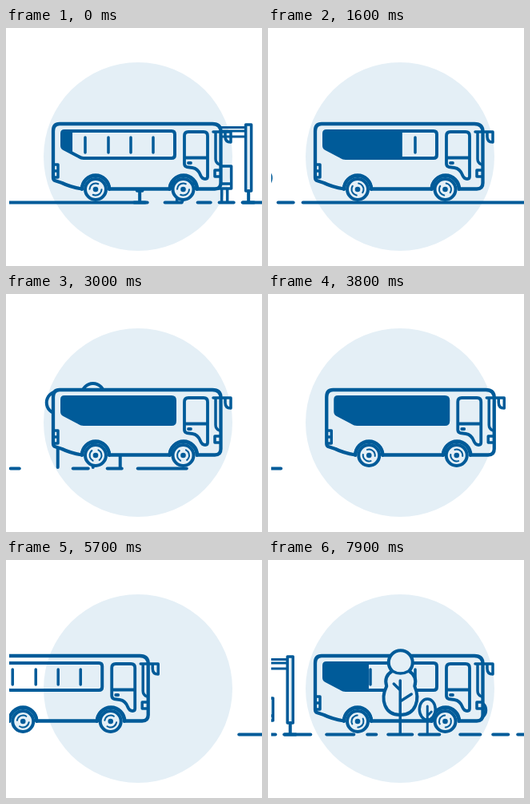
These frames come from a looping animation (320x298 px, 8 s). An HTML page with a canvas:

```html
<!DOCTYPE html>
<html lang="en">
<head>
<meta charset="utf-8">
<title>Bus ride</title>
<style>
html, body { margin: 0; height: 100%; overflow: hidden; background: #fff; }
canvas { display: block; }
</style>
</head>
<body>
<canvas id="stage" width="320" height="298"></canvas>
<script>
const ctx = document.getElementById('stage').getContext('2d');
const BLUE = '#005b99', PALE = '#e4eff6';
const LOOP = 8, CYCLE = 7.09, SPEED = 340, GROUND = 218.5;

const bodyPath = new Path2D('M67 120H258Q268.5 120 268.5 130V194Q268.5 201.5 261 201.5H239A17 17 0 0 0 205 201.5H129A17 17 0 0 0 95 201.5Q80 199 70 194L61 191Q59 190 59 187V129Q59 120 67 120Z');
const windowPath = new Path2D('M73 129H207Q211 129 211 133V159Q211 163 207 163H97Q94 163 91 161L72 151Q70 150 70 147V132Q70 129 73 129Z');
const doorPath = new Path2D('M228 130H247Q252 130 252 135V186Q252 189 249 189Q245 189 243 184Q240 176 233 175L226 174Q223 173 223 170V135Q223 130 228 130ZM223 162.5H252M228 169H231');
const bigTree = new Path2D('M156 139A15 15 0 1 1 177 139Q188 146 184 158C191 174 186 194 166 194S141 174 149 158Q145 146 156 139Z');
// Start and end of each stretch of road
const road = [[-183, 179], [197, 222], [238, 258], [265, 287], [294, 331], [347, 385], [398, 413], [424, 458],
  [463, 492], [514, 543], [555, 578], [586, 1008], [1024, 1039], [1102, 1125], [1145, 1167], [1183, 1248]];

function stroke(path, width = 4) {
  ctx.lineWidth = width;
  ctx.stroke(typeof path === 'string' ? new Path2D(path) : path);
}

function shape(path, width) {
  ctx.fillStyle = PALE;
  ctx.fill(path);
  stroke(path, width);
}

function disc(x, y, r, fill) {
  ctx.beginPath();
  ctx.arc(x, y, r, 0, 7);
  ctx.fillStyle = fill;
  ctx.fill();
}

function backdrop(shift = 0) {
  ctx.fillStyle = '#fff';
  ctx.fillRect(-shift, 0, 320, 298);
  disc(165 - shift, 161, 118, PALE);
}

function bush(x, y, r) {
  const crown = new Path2D();
  crown.arc(x, y, r, 0, 7);
  shape(crown);
}

function roundTree(x, y, r) {
  stroke(`M${x} ${y}V217`);
  bush(x, y, r);
}

function pole(x) {
  const post = new Path2D();
  post.rect(x - 3.5, 121, 7, 83);
  shape(post, 3.5);
  stroke(`M${x} 204V217M${x - 7} ${GROUND}H${x + 7}`);
}

function shelter() {
  stroke('M167 124.5H300M167 129H300M167 136H299', 3);
  stroke('M210 173H282V201H210ZM210 195H282M214 201V217M221 201V217M270 201V217M277 201V217', 3.5);
  pole(167.5);
  pole(303.5);
}

function frontTrees() {
  ctx.save();
  ctx.translate(275, 0);
  shape(bigTree);
  stroke('M156 139Q166 145 177 139M166 151V217M166 163L158 155M166 177L180 168', 3.5);
  const small = new Path2D();
  small.ellipse(200, 187, 10, 13, 0, 0, 7);
  shape(small, 3.5);
  stroke('M200 183V217M200 195L205 190', 3);
  ctx.restore();
}

function wheel(x, turn) {
  disc(x, 202, 13, PALE);
  ctx.lineWidth = 4;
  ctx.stroke();
  for (const a of [0, Math.PI]) {
    ctx.beginPath();
    ctx.arc(x, 202, 7.5, turn + a, turn + a + 2);
    ctx.lineWidth = 2;
    ctx.stroke();
  }
  disc(x, 202, 3.3, BLUE);
}

function bus(shift, filledTo, turn) {
  ctx.save();
  ctx.translate(shift, 0);
  ctx.save();
  ctx.clip(bodyPath);
  backdrop(shift);
  ctx.restore();
  stroke(bodyPath, 4.3);
  stroke('M99 137V156M128 137V156M156 137V156M184 137V156', 3.5);
  ctx.save();
  ctx.clip(windowPath);
  ctx.fillStyle = BLUE;
  ctx.fillRect(68, 126, filledTo - 68, 42);
  ctx.restore();
  stroke(windowPath);
  stroke(doorPath, 3.8);
  stroke('M60 171H65V187H60M60 179H65M267 178H261V186H267', 3.5);
  stroke('M259 130H281V143Q274 143 274 136V131M262 131V164Q262 169 267 171', 3.5);
  for (const x of [112, 221.5]) {
    ctx.beginPath();
    ctx.arc(x, 202, 17, Math.PI, 0);
    ctx.lineWidth = 4;
    ctx.stroke();
    wheel(x, turn);
  }
  ctx.restore();
}

function draw(t) {
  const s = t < 5 ? t : t - CYCLE;
  const travel = s < 3 ? SPEED * s : SPEED * 3 + 262 * (s - 3);
  const shift = t < 5 ? 450 * Math.max(0, t - 3.623) ** 2 : -253 * Math.max(0, 6.3 - t) ** 2;
  const filledTo = Math.min(214, Math.max(68, 83 + (s < 0 ? 16 : 53) * s));

  ctx.clearRect(0, 0, 320, 298);
  backdrop();
  ctx.save();
  ctx.beginPath();
  ctx.rect(4, 0, 316, 298);
  ctx.clip();
  ctx.strokeStyle = BLUE;
  ctx.lineCap = ctx.lineJoin = 'round';

  ctx.save();
  ctx.translate(-travel, 0);
  for (const [a, b] of road) stroke(`M${a + 2} ${GROUND}H${b - 2}`);
  shelter();
  bush(537, 188, 11);
  roundTree(1085, 136, 14);
  roundTree(1129, 126, 14);
  roundTree(1163, 180, 12);
  ctx.restore();

  bus(shift, filledTo, (travel + shift) / 15);

  ctx.save();
  ctx.translate(-travel, 0);
  frontTrees();
  ctx.restore();
  ctx.restore();
}

const start = performance.now();
function tick() {
  draw((performance.now() - start) / 1000 % LOOP);
  requestAnimationFrame(tick);
}
tick();
</script>
</body>
</html>
```
